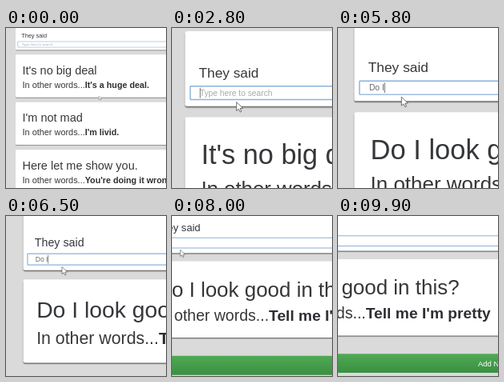
An HTML page with a canvas that plays this animation: 200x200 px, repeating every 10000 ms.

```html
<!DOCTYPE html>
<html lang="en">
<head>
<meta charset="utf-8">
<title>In other words</title>
<style>
  html, body { margin: 0; width: 100%; height: 100%; overflow: hidden; background: #dadada; }
  canvas { display: block; width: 100%; height: 100%; }
</style>
</head>
<body>
<canvas id="stage" width="200" height="200"></canvas>
<script>
const ctx = document.getElementById("stage").getContext("2d");
const LOOP = 10000, STEP = 100, BLINK = 510;
const FONT = '"Liberation Sans", Arial, sans-serif';
const PAGE_WIDTH = 400;

// Page units: origin at the search card's left edge and the input's middle.
const INPUT = { x: 2.75, height: 7.1, textX: 7.8, size: 4.35 };
const CARD = { top: 12.8, height: 53.4, pitch: 59.5, textX: 8.5 };

// time, zoom, screen x and y of the page origin
const CAMERA = [
  [0, 1, 12, 20.5],
  [1100, 1, 12, 29.5],
  [2000, 1, 12, 29.5],
  [3200, 3.05, 18.4, 107],
  [4700, 3.05, 18.4, 107],
  [6770, 1.79, 22, 46.2],
  [8100, 1.79, -38.7, 32.6],
  [LOOP, 1.79, -125, 31]
];

// time of each key press and the text it leaves in the input
const KEYS = [[1495, ""], [3700, "D"], [4200, "Do"], [4900, "Do "], [5400, "Do I"]];

const PHRASES = [
  ["It's no big deal", "It's a huge deal."],
  ["I'm not mad", "I'm livid."],
  ["Here let me show you.", "You're doing it wrong."],
  ["Do I look good in this?", "Tell me I'm pretty"]
];

const mix = (a, b, p) => a + (b - a) * p;
const progress = (t, from, to) => Math.min(1, Math.max(0, (t - from) / (to - from)));

function cameraAt(t) {
  const next = Math.max(1, CAMERA.findIndex(key => key[0] > t));
  const a = CAMERA[next - 1], b = CAMERA[next];
  const p = progress(t, a[0], b[0]);
  return [1, 2, 3].map(i => mix(a[i], b[i], p));
}

function matching(query) {
  if (query.length < 2) return PHRASES;
  return PHRASES.filter(pair => pair.join(" ").toLowerCase().includes(query.toLowerCase()));
}

function text(string, x, y, size, color = "#35373a", weight = "normal") {
  ctx.font = `${weight} ${size}px ${FONT}`;
  ctx.fillStyle = color;
  ctx.fillText(string, x, y);
  return x + ctx.measureText(string).width;
}

function box(x, y, width, height, radius, fill) {
  ctx.beginPath();
  ctx.roundRect(x, y, width, height, radius);
  ctx.fillStyle = fill;
  ctx.fill();
}

function card(top, height, zoom) {
  ctx.save();
  ctx.shadowColor = "rgba(0,0,0,.5)";
  ctx.shadowBlur = 0.6 * zoom;
  ctx.shadowOffsetY = 0.7 * zoom;
  box(0, top, PAGE_WIDTH, height, 1.1, "#fff");
  ctx.restore();
}

function searchCard(t, typed, lastKey, zoom) {
  card(-32.6, 39.6, zoom);
  text("They said", 7.3, -8.2, 7.3);

  const { x, height, textX, size } = INPUT;
  box(x, -height / 2, PAGE_WIDTH - 2 * x, height, 0.3, "#fff");
  ctx.strokeStyle = "#8ab2dc";
  ctx.lineWidth = 0.6;
  ctx.stroke();

  const end = typed
    ? text(typed, textX, 1.6, size, "#6a6a6a")
    : (text("Type here to search", textX, 1.6, size, "#aaa"), textX);
  const caretOn = lastKey !== null && Math.floor((t - lastKey) / BLINK) % 2 === 0;
  if (caretOn) box(end, -2.7, 0.4, 5.4, 0, "#666");
}

function phraseCard([said, meant], index, zoom) {
  const top = CARD.top + index * CARD.pitch;
  card(top, CARD.height, zoom);
  text(said, CARD.textX, top + 24.6, 14.5);
  const x = text("In other words...", CARD.textX, top + 41.5, 10.92);
  text(meant, x, top + 41.5, 10.75, "#2d2f33", "bold");
}

function addButton(top) {
  const height = 13.4;
  const green = ctx.createLinearGradient(0, top, 0, top + height);
  green.addColorStop(0, "#50aa55");
  green.addColorStop(1, "#3a8f40");
  box(4.4, top, PAGE_WIDTH - 8.8, height, 1.7, green);
  text("Add New", 165, top + 8.8, 5.3, "#fff");
}

function pointer(t) {
  const rest = (1 - progress(t, 0, 1300)) ** 2;
  const x = mix(27.2, 104, rest) - 2.4 * progress(t, 4700, 5800);
  const y = mix(4.8, 64.5, rest);
  const outline = [[0, 0], [0, 4.6], [1.1, 3.7], [1.9, 5.3], [2.6, 5], [1.9, 3.4], [3.4, 3.3]];
  ctx.beginPath();
  for (const [dx, dy] of outline) ctx.lineTo(x + dx, y + dy);
  ctx.closePath();
  ctx.fillStyle = "#fff";
  ctx.fill();
  ctx.strokeStyle = "#555";
  ctx.lineWidth = 0.35;
  ctx.stroke();
}

function draw(t) {
  const [zoom, x, y] = cameraAt(t);
  const [lastKey, typed] = KEYS.filter(key => key[0] <= t).pop() || [null, ""];
  const phrases = matching(typed);

  ctx.setTransform(1, 0, 0, 1, 0, 0);
  ctx.fillStyle = "#dadada";
  ctx.fillRect(0, 0, 200, 200);
  ctx.setTransform(zoom, 0, 0, zoom, x, y);

  searchCard(t, typed, lastKey, zoom);
  phrases.forEach((pair, i) => phraseCard(pair, i, zoom));
  addButton(CARD.top + phrases.length * CARD.pitch + 6.5);
  pointer(t);
}

const start = performance.now();
function tick() {
  const elapsed = (performance.now() - start) % LOOP;
  draw(Math.floor(elapsed / STEP) * STEP);
  requestAnimationFrame(tick);
}
tick();
</script>
</body>
</html>
```
